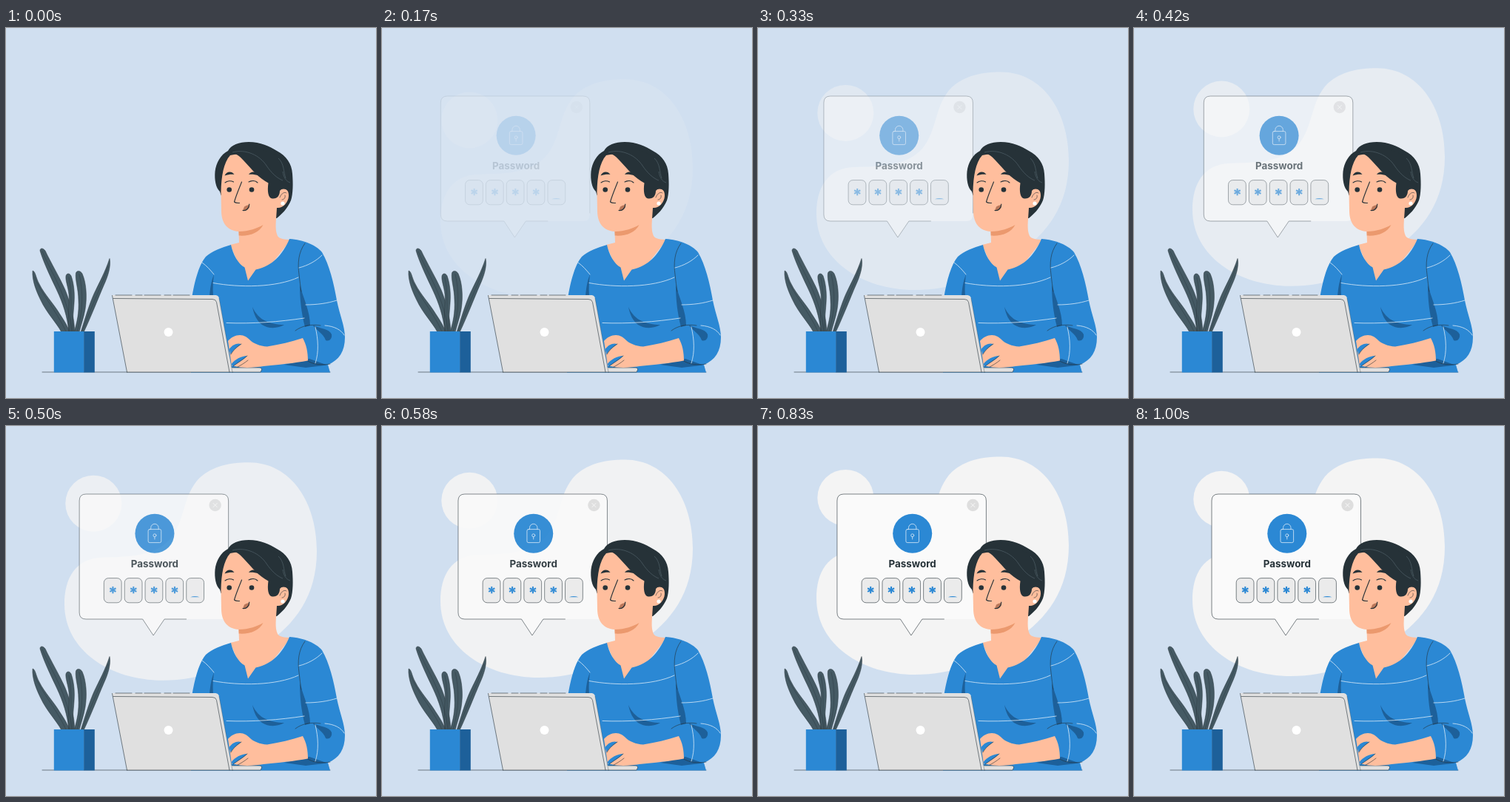
An HTML page that plays this animation: 500 by 500 pixels, repeating every 1.04 s.

```html
<!DOCTYPE html>
<html lang="en">
<head>
<meta charset="utf-8">
<title>Password prompt</title>
<style>
  html, body { margin: 0; width: 100%; height: 100%; overflow: hidden; background: #d0dff0; }
  svg { display: block; width: 100%; height: 100%; }
  .blue { fill: #2b88d4; }
  .deep { fill: #1d609a; }
  .dark { fill: #263238; }
  .skin { fill: #ffbe9d; }
  .leaf { fill: #455a64; stroke: #263238; stroke-width: .5; }
  .line { fill: none; stroke: #263238; stroke-width: .6; stroke-linecap: round; stroke-linejoin: round; }
  .bold { stroke-width: 1.1; }
  .pale { fill: none; stroke: #dcebf8; stroke-width: .8; stroke-linecap: round; }
  .strand { fill: none; stroke: #56676f; stroke-width: .6; }
  .title { font: 700 13.4px Inter, "Open Sans", sans-serif; text-anchor: middle; }
</style>
</head>
<body>
<svg viewBox="0 0 500 500">
  <g id="blob" fill="#f4f4f4">
    <path d="M79 235C79 200 94 173 130 172C165 171 200 171 222 147C243 122 238 88 262 64C280 48 303 43.5 328 43.5C385 43.5 420 97 420 163C420 225 390 262 350 290C310 320 262 338 212 338C140 338 79 297 79 235Z"/>
    <circle cx="118.3" cy="98.8" r="38"/>
  </g>

  <g id="dialog">
    <path fill="#fafafa" d="M114 92H297.5Q306.5 92 306.5 101V252Q306.5 261 297.5 261H220L205 283L190.5 261H114Q105 261 105 252V101Q105 92 114 92Z"/>
    <path class="line" d="M249.5 261H220L205 283L190.5 261H114Q105 261 105 252V101Q105 92 114 92H297.5Q306.5 92 306.5 101V250"/>
    <circle cx="288.5" cy="107" r="8.2" fill="#dedede"/>
    <path d="M285.7 104.2l5.6 5.6m0-5.6l-5.6 5.6" stroke="#fafafa" stroke-width=".9"/>
    <circle class="blue" cx="206.8" cy="145.3" r="26.5"/>
    <g class="pale">
      <rect x="198" y="139.6" width="17.6" height="18" rx="2"/>
      <path d="M201.6 139.6V137.5A5.2 5.2 0 0 1 212 137.5V139.6M206.8 149.8V153"/>
      <circle cx="206.8" cy="147.8" r="2"/>
    </g>
    <text class="title dark" x="206.8" y="190.5">Password</text>
    <g id="cells"></g>
    <path class="blue" d="M255 231.2Q261 228.8 267.5 231.2Z"/>
  </g>

  <path class="line" d="M49 465H438"/>

  <g id="plant">
    <path class="leaf" d="M36 328C40 329 40 337 45 346C52 360 64 372 73 387C79 396 84 404 86 411H75C68 398 55 385 47 368C41 356 35 341 36 328Z"/>
    <path class="leaf" d="M140 311.5C142 322 138 335 132 348C125 364 115 390 105 411H101C107 392 113 372 119 359C126 344 134 330 140 311.5Z"/>
    <path class="leaf" d="M94.500 331C96 327 101 328 103 332C108 343 110 362 107 380C105 392 101 402 99 411H92C96 398 99 384 98 368C98 352 93 340 94.500 331Z"/>
    <path class="leaf" d="M46 301C46 297 50 297 53 301C60 316 73 338 80 354C87 371 92 390 93 411H85C83 390 77 372 69 355C62 340 51 318 46 301Z"/>
    <path class="leaf" d="M81 335C82 331 86 331 88 335C92 346 93 360 92 372C91 387 89 400 91 411H86C83 395 86 372 85 360C84 350 80 341 81 335Z"/>
    <path class="line" stroke-opacity=".6" d="M38 336C48 360 68 382 81 410M49 302C62 333 84 362 89 410M85 337C90 362 87 390 88 410M99 333C106 362 102 390 96 410M138 322C130 348 114 378 103 410"/>
    <path class="blue" d="M64.800 410H105.500V465.500H64.800Z"/>
    <path class="deep" d="M105.200 410H119.800V465.500H105.200Z"/>
  </g>

  <g id="woman">
    <path class="dark" d="M290.500 226L289 221C283.500 216 281.500 205 282.500 194C284 182 290 171 300 166C304 158 315 154 328 154C344 154 356 160 366 166C379 173 386 183 387 197C388 210 388 224 385 233C380 245 372 252 366 257L350 258Z"/>
    <path class="skin" d="M303 172C294 182 291 200 290.500 222L291 248C291.500 265 300 274 314.500 275L315 290L303 293L325 345L350 330L385 286C377 286 369 285 367 281C363 272 365 262 366 243C374 244 381.500 236 382 227C382.500 217 375 215 369 219L355 190L325 168Z"/>
    <path fill="#eb996e" d="M314.500 275C328 275 340 270.500 347.500 266C342 277 329 281.500 314.700 280.500Z"/>
    <path class="dark" d="M301 172C311 167 316 174 321 179C333 192 342 203 354.500 209.500C353 220 354 230 360 230.500C367 231 370 226 370 220C373 216 380 217 382.500 222L380 178L330 158Z"/>
    <path class="strand" d="M306 168C324 163 343 172 352 186C358 195 366 203 374 206M368 176C376 183 375 195 378 203M374 194C375 201 378 207 384 209"/>
    <path class="line" d="M370 229C372 223 377 221 379 223M373 232C376 232 378 229 377 226"/>
    <circle cx="374" cy="237" r="2.6" fill="#fff"/>

    <path class="dark" d="M295.500 199.500C298 193.500 305 193 308.500 198C304 197.500 300 198 295.500 199.500ZM328 198C331 192.500 339 193.500 341.500 199.500C337 198 332 197.500 328 198Z"/>
    <path class="line bold" d="M296 209C299 206.500 304 206 307.500 208M328 208C332 206 337 206 340 209"/>
    <circle class="dark" cx="301.700" cy="218.500" r="3.300"/>
    <circle class="dark" cx="332" cy="218.500" r="3.300"/>
    <path class="line bold" d="M318.500 208C315 217 311 226 308.500 235C310 236.500 313 236.700 315.500 236.500"/>
    <path fill="#b9775a" d="M322 241.500C325 239.500 328 239.500 328.800 238C330 243 327 247.500 320 246.500Z"/>
    <path class="line bold" d="M320 246.500C325 247.500 328.800 243 328.800 238"/>

    <path class="blue" d="M304 293C306.500 306 314 319 322.500 323.500L327 341.500L337.500 326.500C360 322 374 306 383 285C402 286 420 294 427 303C437 320 443 345 447 368C451 388 458 403 458 418C458 437 450 449 435 455L438 465.500H250V372C254 345 260 321 270 309C279 301 291 297 304 293Z"/>
    <path class="deep" d="M281 333C277 343 276 352 275 362H280C279 351 280 342 281 333ZM397 347C402 366 411 383 411 402L404 404C399 385 397 365 397 347ZM333 377C337 386 343 392 349 395C357 399 367 401 376 401C368 406 355 407 346 401C339 396 335 387 333 377ZM376 455L410 447L434 455.500L405 459Z"/>
    <path class="line" d="M404 291C395 303 394 318 396 333C397 342 398 350 399 356"/>
    <path class="pale" d="M265 317C271 321 277 328 281 333M280 344.500C315 351 365 351 395 337M396 324C408 321 419 315 427 307M405 374C420 374 435 372 447 368M298 398.500C333 400 370 397 403 392"/>
    <path class="line" d="M391 409C400 402 413 400 425 402M406 449C415 455 427 456 438 454"/>
    <path class="deep" d="M414 401C425 407 437 406 440 414C441 420 437 424 432 422C429 413 420 409 414 401Z"/>
    <path class="pale" d="M418 404C422 421 423 438 418 453M431 402C444 403 453 408 457 415"/>
  </g>

  <g id="laptop">
    <path fill="#e0e0e0" d="M298 459H342Q346 459 345.500 462L344 465H298Z"/>
    <path class="line" d="M306 459H342Q346 459 345.500 462L344 465H306"/>
    <path fill="#e0e0e0" d="M143.500 361H283.500Q287.500 361.500 288 365.500L306 465H163.500Z"/>
    <path class="line" d="M163.500 465L143.500 361.500M145 365.500L279 366.500Q283.500 366.500 284.500 370.500L302 465M306 465H163.500"/>
    <path class="line" stroke-opacity=".5" d="M288 365.500L306 465"/>
    <path class="line" stroke-dasharray="22 5 9 3" d="M148 361H253"/>
    <circle cx="219.500" cy="411" r="6" fill="#fff"/>
  </g>

  <g id="hand">
    <path class="skin" d="M300 423C304 418 310 415 316 415C322 415 326 418 330 422C334 426 343 430 353 430.500C369 428 386 424 401 419C406 428 408 438 408 449.500C390 453 367 455 348 457C337 459 319 460 309 457L305 457Z"/>
    <path class="blue" d="M301.500 434C306 428 312 425 318 427C313 431 308 434 303.500 441ZM304.800 454C309 448 318 443 326 443C321 449 313 452 306 458Z"/>
    <path class="line" d="M318 427C312 431 308 434 304 441M326 443C319 449 312 453 307 457M327 449C322 453 317 456 313 458"/>
  </g>
</svg>
<script>
const LOOP = 1040, TICK = 1000 / 24, LEAD = 33, SLIDE = 30;
const byId = id => document.getElementById(id);
const blob = byId("blob"), dialog = byId("dialog");

const arms = [0, 60, 120].map(a =>
  `<path d="M0 -4.7V4.7" transform="rotate(${a})" stroke="#2b88d4" stroke-width="2.1"/>`).join("");
byId("cells").innerHTML = [0, 1, 2, 3, 4].map(i => {
  const x = 138.2 + i * 27.85;
  const star = i < 4 ? `<g transform="translate(${x + 12.1} 221.6)">${arms}</g>` : "";
  return `<rect x="${x}" y="205.6" width="23.8" height="33.2" rx="6" fill="#ebebeb" stroke="#263238" stroke-width=".6"/>${star}`;
}).join("");

const bezier = (a, b, s) => 3 * (1 - s) ** 2 * s * a + 3 * (1 - s) * s * s * b + s ** 3;

// cubic-bezier(.36, -.01, .5, 1.38): overshoots, then settles
function ease(x) {
  let low = 0, high = 1;
  for (let i = 0; i < 30; i++) {
    const mid = (low + high) / 2;
    if (bezier(.36, .5, mid) < x) low = mid; else high = mid;
  }
  return bezier(-.01, 1.38, high);
}

function draw(ms) {
  const tick = Math.floor((ms % LOOP + 5) / TICK);
  const progress = tick < 2 ? 0 : ease(Math.min(1, (tick * TICK + LEAD) / 1000));
  const offset = SLIDE * (1 - progress);
  const opacity = Math.max(0, Math.min(1, progress));
  blob.setAttribute("transform", `translate(0 ${offset})`);
  dialog.setAttribute("transform", `translate(${-offset} 0)`);
  blob.setAttribute("opacity", opacity);
  dialog.setAttribute("opacity", opacity);
}

let start;
function frame(now) {
  start ??= now;
  draw(now - start);
  requestAnimationFrame(frame);
}
draw(0);
requestAnimationFrame(frame);
</script>
</body>
</html>
```
